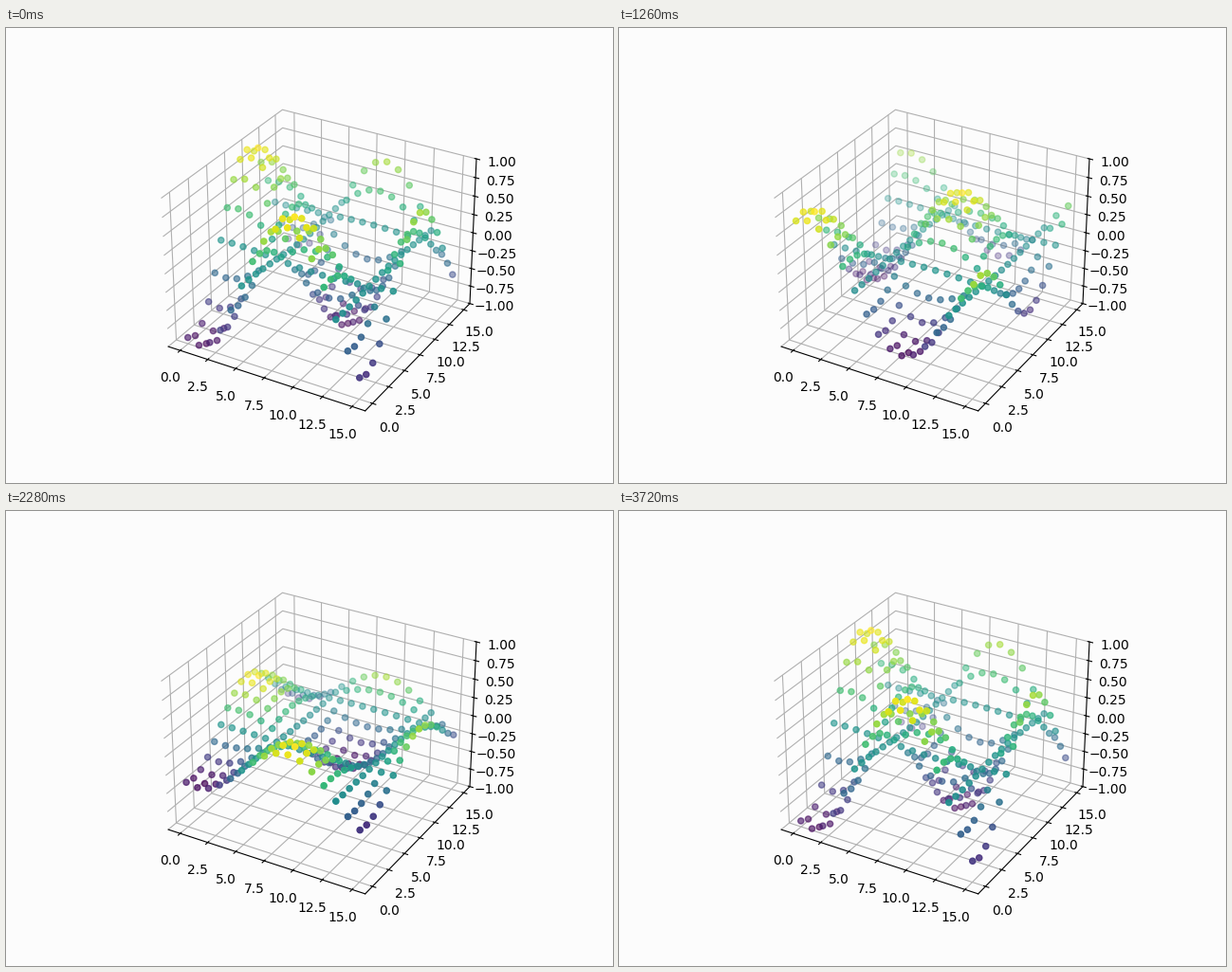
Animation, 640 px wide and 480 px high, one loop 3.75 s. Source, as a matplotlib script:

```python
import numpy as np
import matplotlib.pyplot as plt
from matplotlib.animation import FuncAnimation

FRAMES = 125
INTERVAL = 30
PAPER = "#fcfcfc"

# Swing of the standing wave: (frame, height of the first crest)
KEYS = np.array([
    (0, -1.036), (16, -0.795), (31, 0.04), (36, 0.38), (50.5, 1.04),
    (55, 0.943), (76, -0.433), (91, -0.962), (108, -1.045), (117, -1.06),
])


def smooth_loop(keys, period):
    """Periodic cubic Hermite curve through the keys."""
    shift = np.array([period, 0])
    wrapped = np.vstack([keys[-2:] - shift, keys, keys[:2] + shift])
    times, values = wrapped.T
    slopes = np.gradient(values, times)

    def curve(t):
        i = np.searchsorted(times, t, side="right") - 1
        h = times[i + 1] - times[i]
        s = (t - times[i]) / h
        return ((2 * s**3 - 3 * s**2 + 1) * values[i]
                + (3 * s**2 - 2 * s**3) * values[i + 1]
                + (s**3 - 2 * s**2 + s) * h * slopes[i]
                + (s**3 - s**2) * h * slopes[i + 1])

    return curve


swing = smooth_loop(KEYS, FRAMES)

grid_x, grid_y = (a.ravel() for a in np.meshgrid(np.arange(16), np.arange(16)))


def profile(u):
    return np.cos(0.392 * (u - 0.9))


shape = profile(grid_x) * profile(grid_y)

fig = plt.figure(figsize=(6.4, 4.8), dpi=100, facecolor=PAPER)
ax = fig.add_subplot(projection="3d")
ax.set_facecolor(PAPER)
for axis in (ax.xaxis, ax.yaxis, ax.zaxis):
    axis.set_pane_color(PAPER)
ax.set_zlim(-1, 1)

dots = None


def draw(frame):
    global dots
    if dots is not None:
        dots.remove()
    z = swing(frame) * shape
    # Colours are rescaled to the height range of each frame
    dots = ax.scatter(grid_x, grid_y, z, c=z, cmap="viridis")
    return (dots,)


anim = FuncAnimation(fig, draw, frames=FRAMES, interval=INTERVAL,
                     init_func=lambda: draw(0), repeat=True, repeat_delay=0)
plt.show()
```
